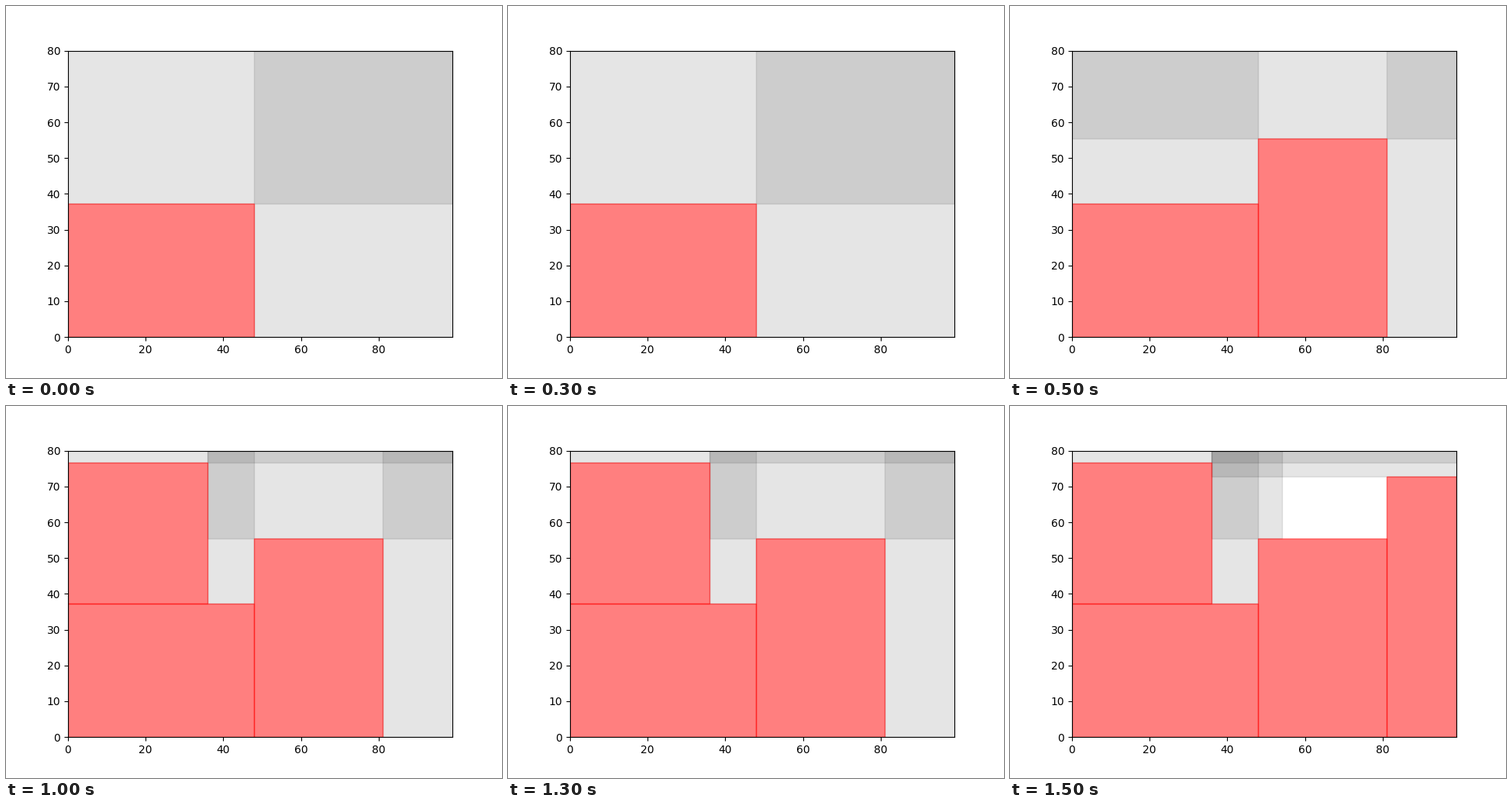
Animation, 640 px wide and 480 px high, one loop 2 s. Source, as a matplotlib script:

```python
import matplotlib.pyplot as plt
from matplotlib.animation import ArtistAnimation
from matplotlib.patches import Rectangle

W, H = 99, 80
X1, X2, X3 = 36, 48, 81
Y1, Y2, Y3, Y4 = 37.27, 55.45, 72.77, 76.67

# Boxes are (left, bottom, right, top), in the order they are packed.
PLACED = [
    (0, 0, X2, Y1),
    (X2, 0, X3, Y2),
    (0, Y1, X1, Y4),
    (X3, 0, W, Y3),
]

# Free areas left over after each box is packed; they may overlap.
FREE = [
    [(X2, 0, W, H), (0, Y1, W, H)],
    [(X3, 0, W, H), (0, Y2, W, H), (0, Y1, X2, H)],
    [(X3, 0, W, H), (X1, Y2, W, H), (X1, Y1, X2, H), (0, Y4, W, H)],
    [(X1, Y2, X1 + W - X3, H), (X1, Y3, W, H), (X1, Y1, X2, H), (0, Y4, W, H)],
]

fig, ax = plt.subplots(figsize=(6.4, 4.8), dpi=100)
ax.set_xlim(0, W)
ax.set_ylim(0, H)


def add_box(box, color, alpha):
    left, bottom, right, top = box
    patch = Rectangle((left, bottom), right - left, top - bottom,
                      color=color, alpha=alpha)
    return ax.add_patch(patch)


steps = []
for i, areas in enumerate(FREE):
    free = [add_box(area, "black", 0.1) for area in areas]
    packed = [add_box(box, "red", 0.5) for box in PLACED[:i + 1]]
    steps.append(free + packed)

anim = ArtistAnimation(fig, steps, interval=500, repeat=True, repeat_delay=0)
plt.show()
```
